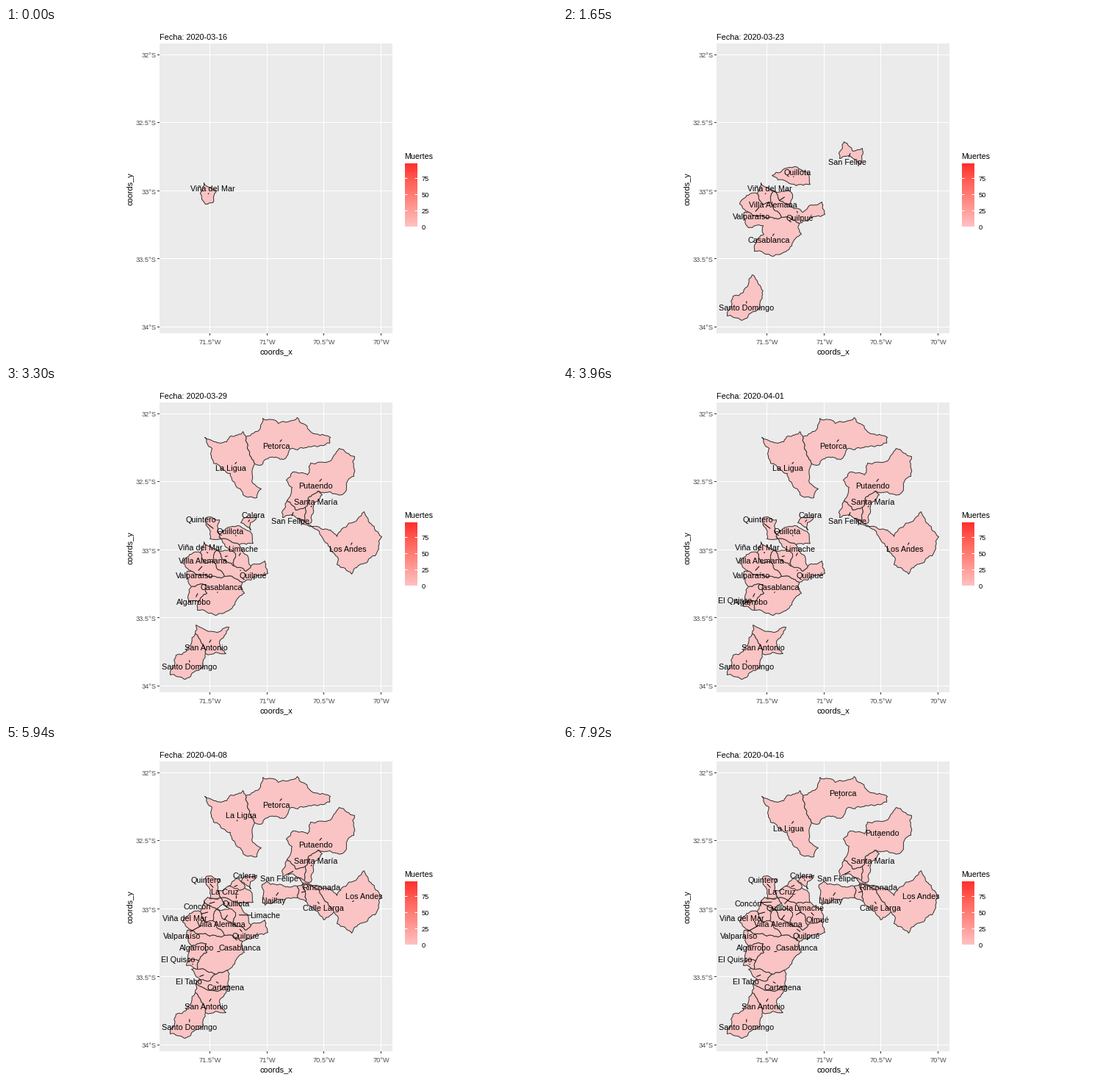
Write a matplotlib script that moves like this. It is 750 px wide and 450 px high and loops after 8 s.

```python
import math

import matplotlib.pyplot as plt
import numpy as np
from matplotlib.animation import FuncAnimation
from matplotlib.colors import LinearSegmentedColormap

W, H, DPI = 750, 450, 100
PX = 72 / DPI
STEP_MS, TICK_MS, LOOP_MS = 330, 40, 8000
DAYS_PER_STEP = 1.303
LEFT, RIGHT, TOP, BOTTOM = 208.5, 525.5, 20.5, 414.5
FILL, EDGE, GREY = "#f9c4c3", "#333333", "#4d4d4d"

plt.rcParams["font.family"] = "Liberation Sans"
fig = plt.figure(figsize=(W / DPI, H / DPI), dpi=DPI, facecolor="white")
ax = fig.add_axes([0, 0, 1, 1])
ax.axis("off")


def text(x, y, s, size=10.9, color="black", **kw):
    return ax.text(x, y, s, fontsize=size * PX, color=color, **kw)


def line(xs, ys, color, z=1):
    return ax.plot(xs, ys, color=color, lw=PX, zorder=z, snap=False,
                   solid_capstyle="butt")[0]


def rough(p, q):
    """Fractal border from p up to q; neighbours get the same curve."""
    length = math.dist(p, q)
    if length < 4:
        return [p]
    a, b = sorted((p, q))
    wave = math.sin(a[0] * 3.1 + a[1] * 1.7 + b[0] * 2.3 + b[1])
    bend = min(0.16, 2 / length) * wave
    mid = ((a[0] + b[0]) / 2 + bend * (a[1] - b[1]),
           (a[1] + b[1]) / 2 + bend * (b[0] - a[0]))
    return rough(p, mid) + rough(mid, q)


def centroid(pts):
    x, y = np.array(pts).T
    nx, ny = np.roll(x, -1), np.roll(y, -1)
    cross = x * ny - nx * y
    return [((v + nv) * cross).sum() / (3 * cross.sum())
            for v, nv in ((x, nx), (y, ny))]


class Region:
    """A commune: corner points and label places keyed by starting step."""

    def __init__(self, name, places, *xy):
        pts = list(zip(xy[::2], xy[1::2]))
        border = [r for p, q in zip(pts, pts[1:] + pts[:1])
                  for r in rough(p, q)]
        self.places, self.start = places, min(places)
        self.anchor = centroid(pts)
        self.half = 2.7 * len(name)
        self.shape = ax.fill(*zip(*border), fc=FILL, ec=EDGE, lw=PX,
                             snap=False, zorder=3)[0]
        self.lead = line([], [], "black", 4)
        self.label = text(0, 0, name, 10.8, ha="center", zorder=5)

    def show(self, step):
        on = step >= self.start
        for part in (self.shape, self.lead, self.label):
            part.set_visible(on)
        if not on:
            return
        x, y = self.places[max(k for k in self.places if k <= step)]
        self.label.set_position((x, y + 4))
        cx, cy = self.anchor
        dx, dy = cx - x, cy - y
        # The lead runs from the anchor to the edge of the label's box
        u = min(1, self.half / max(abs(dx), 1e-6), 6 / max(abs(dy), 1e-6))
        self.lead.set_data([cx, x + dx * u], [cy, y + dy * u])


# Panel, grid and axes
ax.fill([LEFT, RIGHT, RIGHT, LEFT], [TOP, TOP, BOTTOM, BOTTOM],
        color="#ebebeb", lw=0, zorder=0)
for i in range(5):
    y = round(36 + 92.4 * i)
    line([LEFT, RIGHT], [y, y], "white")
    line([LEFT - 3, LEFT], [y, y], EDGE)
    text(204, y + 4, f"{32 + i / 2:g}°S", 9.3, GREY, ha="right")
for i in range(4):
    x = round(277 + 77.6 * i)
    line([x, x], [TOP, BOTTOM], "white")
    line([x, x], [BOTTOM, BOTTOM + 3], EDGE)
    text(x, 429, f"{71.5 - i / 2:g}°W", 9.3, GREY, ha="center")
text(367.5, 443, "coords_x", 11, ha="center")
text(174, 218, "coords_y", 11, rotation=90, ha="right", va="center")
date = text(LEFT, 15, "")

# Colour key
reds = LinearSegmentedColormap.from_list(
    "reds", ["#ffc1c1", "#ff9f9a", "#ff7d75", "#ff5a52", "#ff302d"])
ax.imshow(np.linspace(1, 0, 86)[:, None], cmap=reds, aspect="auto",
          extent=(542.5, 559.5, 269.5, 183.5), zorder=1)
text(541.5, 178, "Muertes", 10.7)
for value in range(0, 100, 25):
    y = 270 - value * 22 / 25
    text(565, y + 4, str(value), 9.4)
    if value:
        line([542.5, 546], [y, y], "white", 2)
        line([556, 559.5], [y, y], "white", 2)

regions = [
    Region("Petorca", {9: (367, 80), 13: (380, 64), 17: (367, 80), 20: (380, 63)},
           326, 67, 346, 55, 349, 42, 370, 49, 396, 41, 412, 58, 441, 68,
           440, 76, 407, 82, 386, 84, 377, 98, 360, 95, 345, 106, 338, 104),
    Region("La Ligua", {9: (305, 110), 13: (319, 94), 20: (306, 111)},
           270, 68, 283, 74, 300, 74, 306, 66, 322, 60, 326, 67, 338, 104,
           335, 130, 347, 138, 341, 150, 322, 146, 305, 117, 295, 112,
           282, 103, 280, 83),
    Region("Putaendo", {9: (421, 134), 20: (434, 117)},
           381, 126, 390, 115, 410, 119, 414, 103, 438, 101, 453, 83,
           474, 94, 473, 121, 465, 126, 457, 146, 424, 141, 411, 150,
           407, 163, 394, 167, 382, 154, 389, 136),
    Region("San Felipe", {5: (386, 181), 17: (371, 180)},
           375, 170, 382, 154, 394, 167, 407, 163, 404, 184, 392, 175,
           376, 177),
    Region("Santa María", {10: (421, 155)},
           407, 163, 411, 150, 424, 141, 430, 146, 419, 158, 415, 184,
           404, 184),
    Region("Los Andes", {6: (479, 204), 8: (465, 220), 13: (479, 220), 17: (487, 204)},
           397, 178, 426, 190, 437, 193, 450, 203, 456, 193, 478, 179,
           487, 169, 496, 185, 511, 203, 502, 229, 473, 247, 470, 254,
           450, 241, 451, 231, 441, 218, 426, 196, 404, 186),
    Region("Calle Larga", {13: (394, 211), 17: (431, 220)},
           404, 186, 426, 196, 441, 218, 446, 225, 432, 236, 420, 222,
           408, 211),
    Region("Rinconada", {17: (429, 191)},
           396, 190, 404, 186, 408, 211, 397, 206),
    Region("Llaillay", {13: (344, 197), 17: (363, 209)},
           348, 188, 354, 184, 378, 190, 396, 190, 397, 206, 372, 208,
           352, 216, 350, 200),
    Region("Quillota", {2: (319, 195), 6: (305, 195), 13: (307, 217),
                        17: (313, 213), 20: (295, 220)},
           284, 200, 308, 189, 332, 196, 336, 212, 317, 214, 292, 206),
    Region("La Cruz", {15: (289, 200), 17: (297, 197)},
           302, 190, 316, 180, 325, 191, 318, 196),
    Region("Calera", {8: (336, 174), 17: (324, 175)},
           319, 184, 326, 177, 341, 175, 332, 184, 333, 194),
    Region("Quintero", {7: (265, 179), 13: (274, 184), 17: (272, 181)},
           271, 178, 290, 180, 288, 191, 292, 206, 277, 206, 274, 190),
    Region("Concón", {13: (260, 218), 20: (252, 213)},
           269, 210, 274, 205, 292, 206, 297, 213, 286, 221),
    Region("Viña del Mar", {0: (281, 218), 2: (267, 233), 3: (281, 218),
                            6: (264, 218), 13: (243, 234)},
           269, 210, 286, 221, 281, 237, 271, 239, 264, 225),
    Region("Valparaíso", {3: (257, 237), 5: (256, 255), 13: (239, 258)},
           240, 239, 254, 225, 264, 225, 271, 239, 281, 237, 297, 257,
           277, 258, 252, 250),
    Region("Quilpué", {3: (322, 257), 8: (336, 255), 13: (326, 258), 20: (331, 258)},
           286, 221, 294, 234, 310, 243, 326, 250, 333, 243, 352, 236,
           356, 253, 333, 262, 321, 265, 297, 257, 281, 237),
    Region("Villa Alemana", {5: (285, 240), 8: (267, 236), 13: (292, 242)},
           286, 221, 304, 220, 312, 226, 310, 243, 294, 234),
    Region("Limache", {7: (322, 219), 13: (352, 230), 20: (334, 219)},
           292, 206, 317, 214, 329, 230, 333, 243, 326, 250, 310, 243,
           312, 226, 297, 213),
    Region("Olmué", {20: (346, 236)},
           317, 214, 336, 212, 352, 221, 352, 236, 333, 243, 329, 230),
    Region("Casablanca", {5: (280, 288), 8: (293, 272), 13: (318, 274)},
           246, 250, 252, 250, 277, 258, 297, 257, 321, 265, 324, 280,
           301, 304, 285, 310, 260, 303, 262, 292, 273, 280, 272, 268,
           252, 271),
    Region("Algarrobo", {8: (255, 291), 13: (259, 274)},
           252, 271, 272, 268, 273, 280, 262, 292, 248, 292),
    Region("El Quisco", {12: (234, 290)},
           248, 292, 262, 292, 260, 303, 245, 298),
    Region("El Tabo", {14: (248, 319)},
           252, 303, 260, 303, 285, 310, 278, 318, 264, 317),
    Region("Cartagena", {14: (299, 328)},
           264, 317, 278, 318, 285, 310, 301, 304, 303, 326, 281, 332,
           258, 323),
    Region("San Antonio", {7: (272, 353)},
           258, 323, 281, 332, 303, 326, 290, 348, 299, 362, 271, 362,
           269, 352, 257, 335),
    Region("Santo Domingo", {3: (249, 380), 15: (256, 363), 16: (249, 381)},
           257, 335, 269, 352, 271, 362, 268, 380, 243, 397, 223, 391,
           231, 364, 245, 359),
]

# Whole coordinates fall on pixel centres
ax.set_xlim(-0.5, W - 0.5)
ax.set_ylim(H - 0.5, -0.5)


def update(i):
    step = (i * TICK_MS + TICK_MS - 1) // STEP_MS
    day = 16 + round(step * DAYS_PER_STEP)
    month, day = (3, day) if day <= 31 else (4, day - 31)
    date.set_text(f"Fecha: 2020-{month:02d}-{day:02d}")
    for region in regions:
        region.show(step)


anim = FuncAnimation(fig, update, frames=LOOP_MS // TICK_MS, interval=TICK_MS,
                     init_func=lambda: update(0), repeat=True, repeat_delay=0)
plt.show()
```
